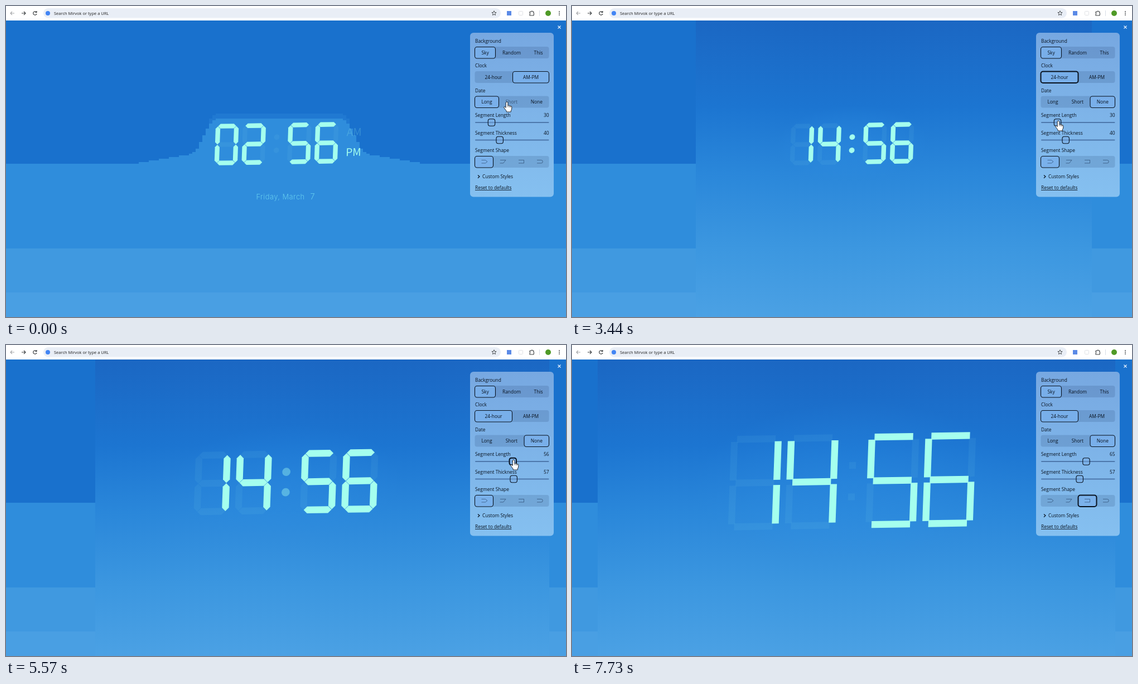
Animation, 1004 px wide and 558 px high, one loop 8.28 s. Source, as an HTML page with a canvas:

```html
<!DOCTYPE html>
<html lang="en">
<head>
<meta charset="utf-8">
<title>Segment clock settings</title>
<style>
html, body { margin: 0; width: 100%; height: 100%; overflow: hidden; background: #1971cd; }
canvas { display: block; width: 1004px; height: 558px; }
</style>
</head>
<body>
<canvas id="stage" width="1004" height="558"></canvas>
<script>
const ctx = document.getElementById('stage').getContext('2d');
const LOOP = 8280, STEP = LOOP / 60, GLIDE = 300;
const UI = '"Open Sans", "Noto Sans", sans-serif';
const INK = '#08121f';
const LIT = '#a5ffee';

// Moments at which a setting changes
const AT = { shortDate: 680, noDate: 1920, day: 2480, slanted: 6340, square: 6880 };

// Each stop: [arrival time, value, ...]
const POINTER = [
  [0, 898, 173], [1780, 948, 172], [2200, 873.5, 125], [3300, 872, 207], [4150, 889, 207],
  [4410, 887, 236], [5150, 910, 238], [5480, 910, 207], [6100, 923, 207],
  [6300, 890, 279], [6600, 914, 281], [7700, 964, 590]
];
const LENGTH = [[0, 30], [4150, 42], [5500, 56], [6100, 65]];
const THICKNESS = [[0, 40], [5150, 57]];
const COLON_PEAKS = [3330, 5780, 6640];

const clamp = v => Math.max(0, Math.min(1, v));
const smooth = v => (v = clamp(v), v * v * (3 - 2 * v));

// Rests at each stop and eases into the next one shortly before its arrival
function glide(stops, t) {
  let now = stops[0].slice(1);
  for (const [arrive, ...goal] of stops.slice(1)) {
    const f = smooth((t - arrive) / GLIDE + 1);
    now = now.map((v, i) => v + (goal[i] - v) * f);
  }
  return now;
}

function stateAt(t) {
  const shape = t < AT.slanted ? 0 : t < AT.square ? 1 : 2;
  return {
    t, shape,
    day: t >= AT.day,
    date: t < AT.shortDate ? 0 : t < AT.noDate ? 1 : 2,
    length: glide(LENGTH, t)[0],
    thickness: glide(THICKNESS, t)[0],
    span: glide(LENGTH, t - 190)[0] + (shape === 2 ? 13.5 : 3)
  };
}

function poly(points, fill) {
  ctx.beginPath();
  points.forEach(([x, y]) => ctx.lineTo(x, y));
  ctx.closePath();
  ctx.fillStyle = fill;
  ctx.fill();
}

function box(x, y, w, h, r, fill, stroke, line = 1) {
  ctx.beginPath();
  ctx.roundRect(x, y, w, h, r);
  if (fill) { ctx.fillStyle = fill; ctx.fill(); }
  if (stroke) { ctx.strokeStyle = stroke; ctx.lineWidth = line; ctx.stroke(); }
}

function dot(x, y, r, fill) {
  ctx.beginPath();
  ctx.arc(x, y, r, 0, 7);
  ctx.fillStyle = fill;
  ctx.fill();
}

function path(d, color, line = 1.2) {
  ctx.strokeStyle = color;
  ctx.lineWidth = line;
  ctx.stroke(new Path2D(d));
}

function text(s, x, y, { size = 8.4, align = 'left', color = INK, font = UI, weight = 400, space = 0 } = {}) {
  ctx.font = `${weight} ${size}px ${font}`;
  ctx.textAlign = align;
  ctx.letterSpacing = space + 'px';
  ctx.fillStyle = color;
  ctx.fillText(s, x, y);
}

// ---------- sky ----------
function makeGradient(y0, y1, stops) {
  const g = ctx.createLinearGradient(0, y0, 0, y1);
  stops.forEach(([y, c]) => g.addColorStop((y - y0) / (y1 - y0), c));
  return g;
}
const SKY = makeGradient(26, 558, [
  [26, '#1b67c3'], [180, '#1c75d1'], [300, '#2a87da'], [435, '#3c97e0'], [558, '#4ba1e4']
]);
const PANEL = makeGradient(48, 343, [[48, '#77a8e1'], [343, '#85c0f0']]);

// Stepped rise of the lower sky band around the clock
function mound(reach, lift, fill) {
  ctx.fillStyle = fill;
  for (let x = 490 - reach; x < 490 + reach; x += 6) {
    const d = Math.abs(x + 3 - 490);
    const rise = 18 * clamp((262 - d) / 110) + 62 * smooth((158 - d) / 45) + lift;
    const h = Math.round(rise / 3) * 3;
    ctx.fillRect(x, 283 - h, 6, h);
  }
}

// The smooth gradient replaces the flat bands in ever larger areas
function smoothArea(t) {
  if (t < 570) return null;
  if (t < AT.day) return [440, 130, 392, 213];
  if (t < 2610) return [345, 117, 487, 231];
  if (t < 3700) return [222, 26, 710, 532];
  const left = t < 4750 ? 195 : t < 5850 ? 160 : t < 6300 ? 131 : 46;
  return [left, 26, 974 - left, 532];
}

function drawSky(t) {
  for (const [y, c] of [[26, '#1971cd'], [283, '#2f8ddc'], [435, '#4099e0'], [514, '#499fe3']]) {
    ctx.fillStyle = c;
    ctx.fillRect(0, y, 1004, 558 - y);
  }
  mound(126, 9, '#2079d2');
  mound(264, 0, '#2f8ddc');
  const area = smoothArea(t);
  if (area) {
    ctx.fillStyle = SKY;
    ctx.fillRect(...area);
  }
}

function drawGlow(radius) {
  const g = ctx.createRadialGradient(0, 0, 0, 0, 0, radius);
  g.addColorStop(0, 'rgba(50,150,235,.22)');
  g.addColorStop(.6, 'rgba(50,150,235,.12)');
  g.addColorStop(1, 'rgba(50,150,235,0)');
  ctx.save();
  ctx.scale(1, .5);
  dot(0, 0, radius, g);
  ctx.restore();
}

// ---------- clock ----------
const DIGITS = { 0: 'abcdef', 1: 'bc', 2: 'abged', 4: 'fgbc', 5: 'afgcd', 6: 'afgedc' };

function segmentEnd(shape, corner, side, w) {
  const h = w / 2, gap = 0.35;
  if (shape === 2) return [[w * .38, -h], [w * .38, h]];
  if (shape === 1 && corner) return [[gap + side * h, -h], [gap - side * h, h]];
  return [[gap + h, -h], [gap, 0], [gap + h, h]];
}

function drawDigit(n, cx, span, w, shape) {
  const draw = (name, vertical, x, y, side, c0, c1) => {
    const start = segmentEnd(shape, c0, side, w);
    const end = segmentEnd(shape, c1, side, w).reverse().map(([u, v]) => [span - u, v]);
    const points = [...start, ...end].map(([u, v]) => vertical
      ? [cx + x * span + v, y * span + u]
      : [cx + x * span + u, y * span + v]);
    poly(points, DIGITS[n].includes(name) ? LIT : 'rgba(165,255,238,.06)');
  };
  [...'agd'].forEach((name, i) => draw(name, false, -.5, i - 1, i - 1, i !== 1, i !== 1));
  [...'fbec'].forEach((name, i) => {
    const side = i % 2 ? 1 : -1, top = i < 2;
    draw(name, true, side / 2, top ? -1 : 0, side, top, !top);
  });
}

function drawClock({ t, day, date, shape, span, thickness }) {
  const w = .235 * thickness - 1.1;
  const pitch = span + w * 1.9;
  const inner = (span + w) / 2 + 6 + 1.7 * w;
  const places = [-inner - pitch, -inner, inner, inner + pitch];
  ctx.save();
  ctx.transform(1, -.0165, -.035, 1, day ? 502 : 485, 249 - .06 * span);
  if (day) drawGlow(pitch * 2.8);
  [...(day ? '1456' : '0256')].forEach((n, i) => drawDigit(n, places[i], span, w, shape));

  ctx.globalAlpha = .06 + .94 * Math.max(...COLON_PEAKS.map(p => Math.exp(-(((t - p) / 250) ** 2))));
  for (const y of [-.36 * span, .36 * span]) {
    if (shape === 2) box(-w / 2, y - w / 2, w, w, 0, LIT);
    else dot(0, y, w * .6, LIT);
  }
  ctx.globalAlpha = 1;
  if (!day) {
    const style = { size: 19, align: 'center', font: '"Noto Sans CJK JP", "Noto Sans CJK SC", sans-serif' };
    text('AM', 138.5, -11.7, { ...style, color: `rgba(165,255,238,${t < 570 ? .2 : .09})` });
    text('PM', 138.5, 24.3, { ...style, color: LIT });
  }
  ctx.restore();

  if (date < 2) {
    const style = { font: 'Inter, sans-serif', weight: 300, color: '#62caee', space: .4 };
    text(['Friday, March', 'Fri, Mar'][date], [448.5, 467][date], 346.5, { ...style, size: 13 });
    text('7', [545.5, 528][date], 346.5, { ...style, size: 14.5 });
  }
}

// ---------- browser bar ----------
function drawBar() {
  ctx.fillStyle = '#fff';
  ctx.fillRect(0, 0, 1004, 26);
  box(67, 4, 820, 17.5, 8.75, '#e9eef6');
  path('M15 13H8M11 10L8 13L11 16', '#a3a5a8', 1.1);
  path('M28 13H35M32 10L35 13L32 16', '#3c4043');
  path('M54.3 10.8A3.2 3.2 0 1 0 55 14M55 9V11.5H52.5', '#3c4043');
  dot(75, 13, 4, '#4285f4');
  text('Search Mirvok or type a URL', 86, 15.6, { size: 7.5, color: '#1f1f1f' });

  let star = '';
  for (let i = 0; i < 10; i++) {
    const a = i * Math.PI / 5 - Math.PI / 2, r = i % 2 ? 1.9 : 4.3;
    star += `${i ? 'L' : 'M'}${875 + r * Math.cos(a)} ${13 + r * Math.sin(a)}`;
  }
  path(star + 'Z', '#3c4043', .9);
  box(898, 9, 8, 8, 0, '#5b8ae6');
  box(919.5, 9.5, 7, 7, 1, null, '#dfe1e4');
  path('M939 10.5H941.5A1.5 1.5 0 0 1 944.5 10.5H946V13A1.5 1.5 0 0 1 946 15.5V17H939V15A1.4 1.4 0 0 0 939 12.5Z', '#3c4043', 1.1);
  ctx.fillStyle = '#d8dde6';
  ctx.fillRect(956, 8, 1, 10);
  dot(972, 13, 5, '#4f9a27');
  for (const y of [10, 13, 16]) dot(992, y, .9, '#3c4043');
}

// ---------- settings panel ----------
function choice(title, y, edges, labels, picked, { faint = -1, focus = false } = {}) {
  text(title, 841, y - 17.5);
  box(840.5, y - 10.5, 133, 21, 4, 'rgba(30,60,110,.17)');
  const x = edges[picked];
  box(x + .5, y - 10, edges[picked + 1] - x - 1, 20.5, 4, 'rgba(124,180,241,.8)', INK, focus ? 2 : 1.1);
  labels.forEach((label, i) => text(label, (edges[i] + edges[i + 1]) / 2, y + 3, {
    align: 'center', color: i === faint ? 'rgba(8,18,31,.5)' : INK
  }));
}

function slider(title, y, value, focus) {
  const x = 826.4 + 1.47 * value;
  text(title, 841, y - 10);
  text(String(Math.round(value)), 973.5, y - 10, { align: 'right' });
  box(841, y - 1, 132.5, 2, 1, '#4d78ac');
  box(x - 6.2, y - 6.2, 12.4, 12.4, 3.5, focus ? '#7cb2ec' : 'rgba(122,174,230,.45)', INK, focus ? 2 : 1.1);
  if (focus) dot(x, y, 1.3, INK);
}

function drawPanel({ t, day, date, shape, length, thickness }) {
  path('M989.5 35.5L994.5 40.5M994.5 35.5L989.5 40.5', '#eaf5ff', 1.1);
  box(832, 48, 150, 294.5, 6, PANEL);
  choice('Background', 83.5, [840, 878, 935, 974], ['Sky', 'Random', 'This'], 0);
  choice('Clock', 127.5, [840, 908, 974], ['24-hour', 'AM-PM'], day ? 0 : 1,
    { faint: t > 2150 && !day ? 0 : -1, focus: day && t < 3700 });
  choice('Date', 172, [840, 884, 928.5, 974], ['Long', 'Short', 'None'], date, { faint: date ? -1 : 1 });
  slider('Segment Length', 209, length, (t > 3550 && t < 4750) || (t > 5200 && t < AT.slanted));
  slider('Segment Thickness', 240.5, thickness, t > 4750 && t < 5200);
  choice('Segment Shape', 279.5, [840, 874, 907, 941, 974], [], shape, { focus: shape === 2 });
  [
    'M852.5 276.5H859.5L863 279.3L859.5 282H852.5',
    'M886 276.5H896L891.5 282H885.5',
    'M919 276.5H928.5V282H919',
    'M952 276.5H959.5A2.75 2.75 0 0 1 959.5 282H952'
  ].forEach(d => path(d, 'rgba(20,45,80,.65)', .8));
  path('M846 303.5L849 306L846 308.7', INK);
  text('Custom Styles', 854, 309);
  text('Reset to defaults', 841, 329);
  ctx.fillStyle = INK;
  ctx.fillRect(841, 330, 65.3, .8);
}

const HAND = new Path2D('M-1.8 .8Q-1.8 -1 0 -1Q1.8 -1 1.8 .8V5.5Q3.5 4.3 4.4 6Q6 5 6.6 6.8' +
  'Q8.6 6 8.8 8.5L8.6 12Q8 14 7.2 15V17H-.8V15.2Q-3.5 12 -5.2 9.3Q-5.5 7.3 -3.6 7.8L-1.8 9.5Z');

function drawPointer(t) {
  ctx.save();
  ctx.translate(...glide(POINTER, t));
  ctx.fillStyle = '#fff';
  ctx.fill(HAND);
  ctx.strokeStyle = '#10161f';
  ctx.lineWidth = .9;
  ctx.stroke(HAND);
  path('M1.8 5.5V8.5M4.4 6V8.8M6.6 6.8V9', '#10161f', .7);
  ctx.restore();
}

function frame() {
  const t = Math.floor(performance.now() % LOOP / STEP) * STEP;
  const state = stateAt(t);
  drawSky(t);
  drawClock(state);
  drawBar();
  drawPanel(state);
  drawPointer(t);
  requestAnimationFrame(frame);
}
frame();
</script>
</body>
</html>
```
